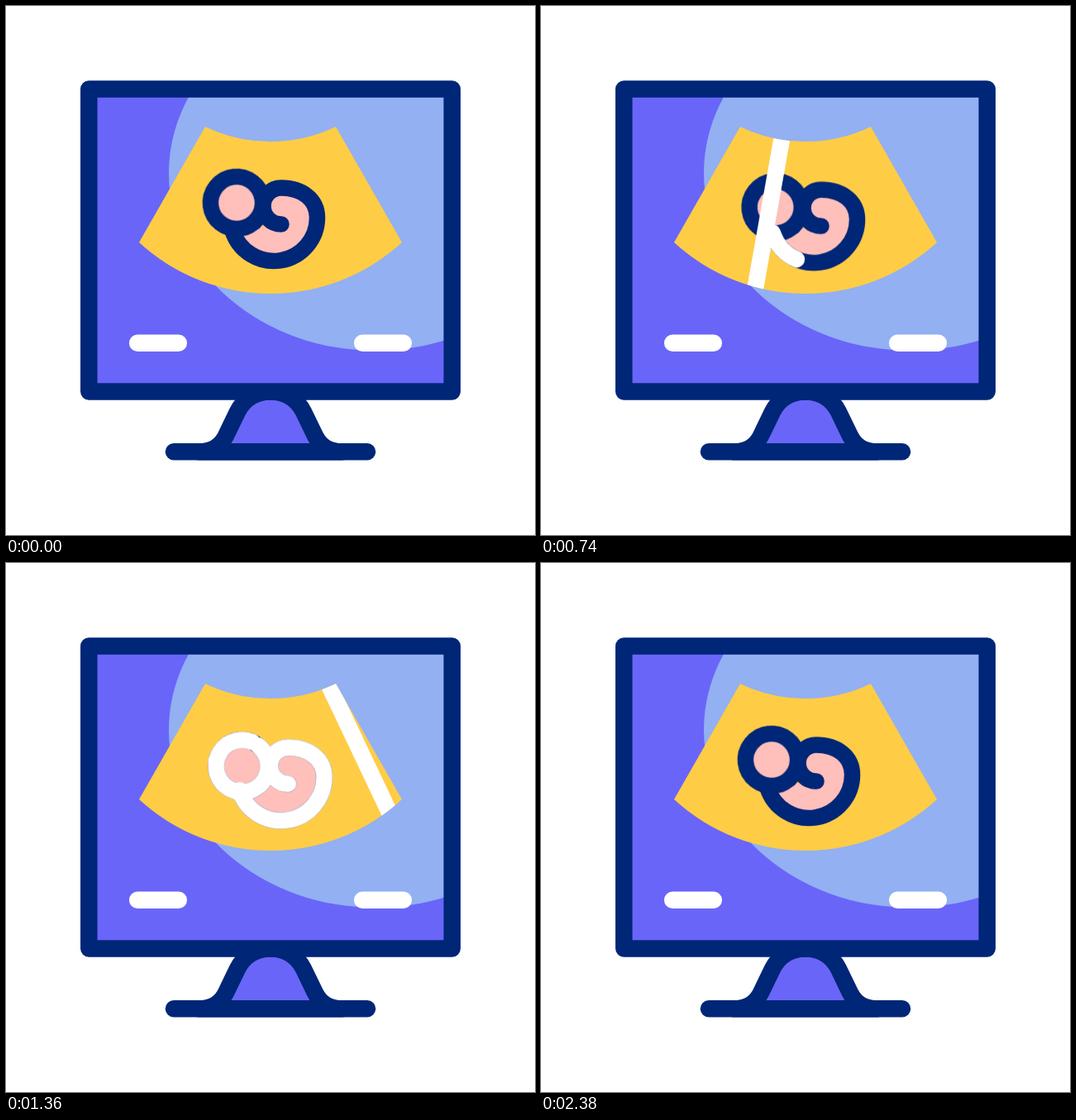
Write an HTML page without scripts that moves like this. It is 640 px wide and 640 px high and loops after 2400 ms.

```html
<!DOCTYPE html>
<html lang="en">
<head>
<meta charset="utf-8">
<title>Ultrasound monitor</title>
<style>
  html, body { margin: 0; width: 100%; height: 100%; overflow: hidden; background: #fff; }
  svg { display: block; width: 100%; height: 100%; }
  :root {
    --navy: #002677;
    --purple: #6965f9;
    --sky: #92b0f2;
    --yellow: #ffcc45;
    --pink: #ffbfba;
    --smooth: cubic-bezier(.333, 0, .667, 1);
  }
  .outline { stroke: var(--navy); stroke-width: 20.5; stroke-linecap: round; stroke-linejoin: round; }
  .purple { fill: var(--purple); }
  .button { stroke: #fff; stroke-width: 20.5; stroke-linecap: round; }
  .baby { fill: var(--pink); stroke: var(--navy); stroke-width: 19.5; stroke-linecap: round; }

  .head { animation: head-drift 2.4s var(--smooth) infinite; }
  .body { animation: body-drift 2.4s var(--smooth) infinite; }
  @keyframes head-drift { 50% { transform: translate(7px, 8px); } }
  @keyframes body-drift { 50% { transform: translate(9px, 3.3px); } }

  .beam {
    stroke: #fff; stroke-width: 20; stroke-linecap: round;
    stroke-dasharray: 100 300;
    transform-origin: 320px -1px;
    animation: sweep 2.4s var(--smooth) infinite, extend 2.4s var(--smooth) infinite;
  }
  @keyframes sweep {
    0%, 11.9% { transform: rotate(27.4deg); }
    62.5%, 100% { transform: rotate(-27.4deg); }
  }
  @keyframes extend {
    0%, 2.5% { stroke-dashoffset: 100; }
    11.9%, 62.5% { stroke-dashoffset: 0; }
    71.6%, 100% { stroke-dashoffset: 100; }
  }

  /* White tracing that grows and fades once complete */
  .pulse {
    fill: none; stroke: #fff; stroke-linecap: round;
    transform-origin: 318px 257px;
    animation: grow 2.4s linear infinite, fade 2.4s var(--smooth) infinite, thin 2.4s linear infinite;
  }
  .pulse use { stroke-dasharray: 100 300; }
  .trace-body { animation: trace-body 2.4s var(--smooth) infinite; }
  .trace-head { animation: trace-head 2.4s var(--smooth) infinite; }
  @keyframes grow {
    0%, 59.6% { transform: scale(1); }
    100% { transform: scale(1.56); }
  }
  @keyframes thin {
    0%, 59.6% { stroke-width: 20px; }
    71.7% { stroke-width: 17.1px; }
    100% { stroke-width: 12.8px; }
  }
  @keyframes fade {
    0%, 66.7% { opacity: 1; }
    100% { opacity: 0; }
  }
  @keyframes trace-body {
    0%, 26.6% { stroke-dashoffset: 120; }
    26.67% { stroke-dashoffset: 100; }
    43.3%, 100% { stroke-dashoffset: 0; }
  }
  @keyframes trace-head {
    0%, 42.4% { stroke-dashoffset: 120; }
    42.5% { stroke-dashoffset: 100; }
    58.75%, 100% { stroke-dashoffset: 0; }
  }
</style>
</head>
<body>
<svg viewBox="0 0 640 640" fill="none">
  <defs>
    <rect id="screen" x="100.3" y="100.5" width="439.4" height="366"/>
    <path id="sector" d="M241 146A182 182 0 0 0 399 146L479 286A235 235 0 0 1 161 286Z"/>
    <clipPath id="screen-clip"><use href="#screen"/></clipPath>
    <clipPath id="sector-clip"><use href="#sector"/></clipPath>
    <circle id="head" r="31.5" pathLength="100" transform="translate(279 238) rotate(-52)"/>
    <path id="body" pathLength="100" d="M274 272A52.5 52.5 0 0 0 376.5 256C376.5 234 358 220 333 220A22 22 0 0 0 333 264"/>
  </defs>

  <path class="outline purple" d="M233 539.3C248 539.3 259 534 266 520L280 491C288 475 303 466.5 320 466.5S352 475 360 491L374 520C381 534 392 539.3 407 539.3Z"/>
  <path class="outline" d="M203 539.3H437"/>

  <use href="#screen" class="purple"/>
  <ellipse cx="447" cy="202" rx="250" ry="215" fill="var(--sky)" clip-path="url(#screen-clip)"/>
  <use href="#screen" class="outline"/>
  <path class="button" d="M159.2 407.7H208.8M431.2 407.7H480.8"/>

  <use href="#sector" fill="var(--yellow)"/>
  <g class="baby">
    <g class="body"><use href="#body"/></g>
    <g class="head"><use href="#head"/></g>
  </g>

  <g clip-path="url(#sector-clip)">
    <path class="beam" pathLength="100" d="M320 149V344"/>
  </g>

  <g class="pulse">
    <g class="body"><use href="#body" class="trace-body"/></g>
    <g class="head"><use href="#head" class="trace-head"/></g>
  </g>
</svg>
</body>
</html>
```
